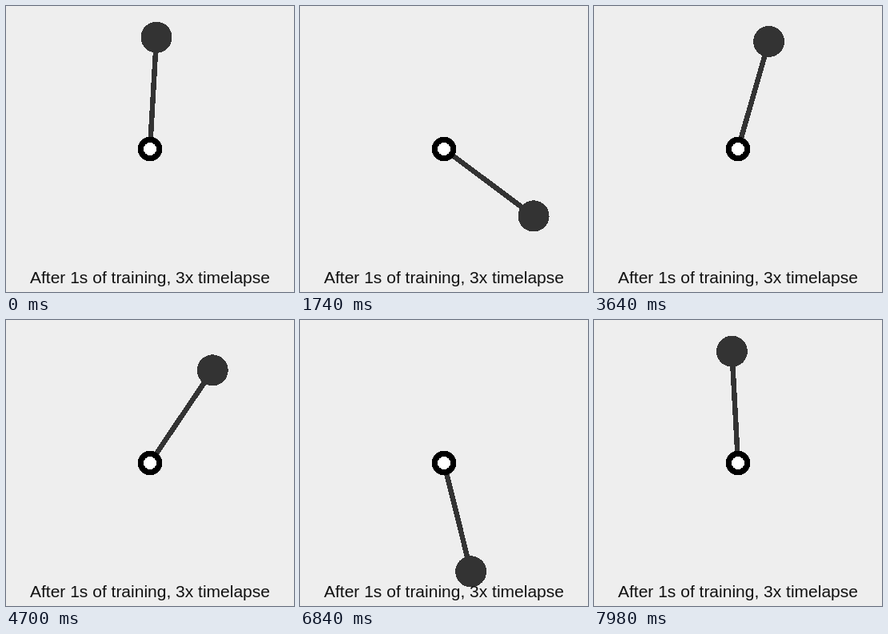
Write an HTML page that moves like this. It is 360 px wide and 358 px high and loops after 8 s.

```html
<!DOCTYPE html>
<html lang="en">
<head>
<meta charset="utf-8">
<title>Pendulum training</title>
<style>
  html, body { margin: 0; width: 100%; height: 100%; overflow: hidden; background: #eee; }
  svg { display: block; width: 100%; height: 100%; }
  text { font: 21px "Liberation Sans", Arial, sans-serif; fill: #111; text-anchor: middle; }
</style>
</head>
<body>
<svg viewBox="0 0 360 358">
  <g shape-rendering="crispEdges">
    <g id="arm" fill="#333" stroke="#333">
      <line x1="180" y1="179" x2="180" y2="39" stroke-width="6.5"/>
      <circle cx="180" cy="39" r="19.5" stroke="none"/>
    </g>
    <circle cx="180" cy="179" r="11.7" fill="#fff" stroke="#000" stroke-width="7.4"/>
  </g>
  <text x="180" y="347">After 1s of training, 3x timelapse</text>
</svg>
<script>
const LOOP = 8000, STEP = 20;

// Keys are [ms, degrees clockwise from upright].
const shift = (keys, start) => keys.map(([t, a]) => [start + t, a]);

// After a reset: swing right, then left to the peak, then climb on the right.
const climb = [[135, 180], [166, 149.5], [230, 90], [300, 52], [390, 29]];
const swingUp = (reset, startAngle, turnAngle, peakTime, peakAngle) => [
  [reset, startAngle], [peakTime - 300, turnAngle], [peakTime, peakAngle],
  ...shift(climb, peakTime)
];

// A full turn to the left, timed from the moment the arm is level.
const fall = [[-210, -12], [-124, -25], [-64, -46], [0, -90], [88, -180],
  [172, -270], [236, -320], [316, -345], [450, -356]];

// The pendulum jumps at the start of each episode.
const episodes = [
  [[0, 3.3]],
  [...swingUp(40, 165, 157, 405, 257), [820, 27.4], [860, 19.5], [960, 8], [1150, 0],
   ...shift(fall, 1604), [2620, -357.6]],
  [...swingUp(2775, 165, 157, 3135, 257), [3640, 16], [3800, 4], [4120, -5],
   ...shift(fall, 4450), [5200, -359]],
  [...swingUp(5205, 163, 153, 5565, 262), [6080, 10], [6350, 1], [6580, -7.2], [6800, -14]],
  [...swingUp(6820, 167, 160, 7209, 247), [7720, 10], [7850, 0], [7980, -3.1]]
];

// Rate of change between two keys, zero outside the list.
const rate = (a, b) => a && b ? (b[1] - a[1]) / (b[0] - a[0]) : 0;

// Slope at a key: harmonic mean of both sides, flat at turning points.
function slope(keys, i) {
  const before = rate(keys[i - 1], keys[i]), after = rate(keys[i], keys[i + 1]);
  return before * after > 0 ? 2 * before * after / (before + after) : 0;
}

function angleAt(time) {
  const keys = episodes.findLast(e => e[0][0] <= time);
  const i = keys.findLastIndex(k => k[0] <= time);
  if (i === keys.length - 1) return keys[i][1];
  const [t0, a0] = keys[i], [t1, a1] = keys[i + 1];
  const span = t1 - t0, u = (time - t0) / span, v = 1 - u;
  return a0 * v * v * (1 + 2 * u) + a1 * u * u * (1 + 2 * v)
       + span * u * v * (slope(keys, i) * v - slope(keys, i + 1) * u);
}

const arm = document.getElementById("arm");
function draw() {
  const time = Math.floor(performance.now() % LOOP / STEP) * STEP;
  arm.setAttribute("transform", `rotate(${angleAt(time).toFixed(2)} 180 179)`);
  requestAnimationFrame(draw);
}
draw();
</script>
</body>
</html>
```
